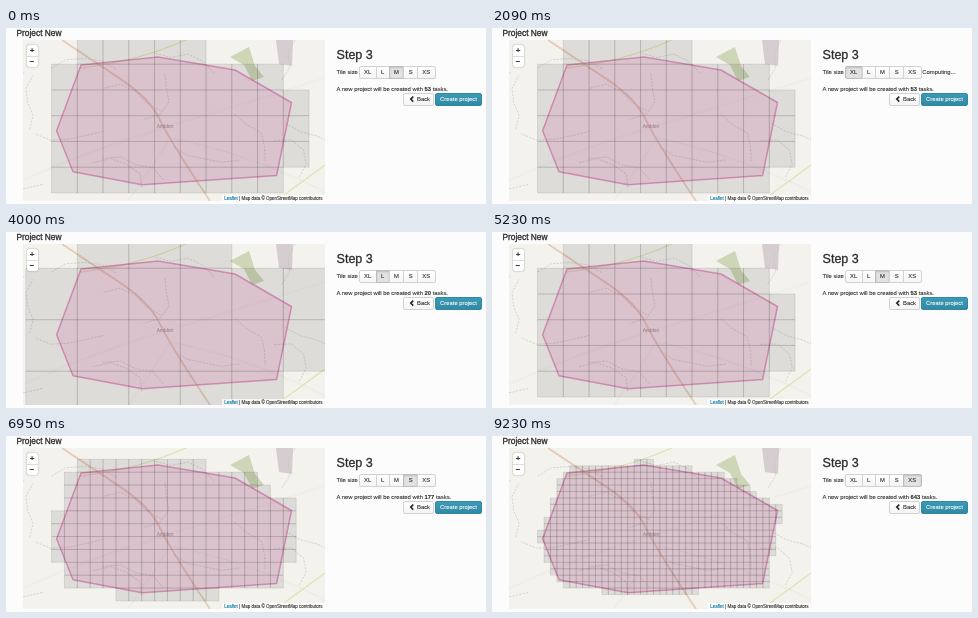
Animation, 480 px wide and 176 px high, one loop 9280 ms. Source, as an HTML page with a canvas:

```html
<!DOCTYPE html>
<html lang="en">
<head>
<meta charset="utf-8">
<title>Project New</title>
<style>
  html, body { margin: 0; width: 100%; height: 100%; overflow: hidden; background: #fdfcfd; }
  #stage { position: relative; width: 480px; height: 176px; overflow: hidden;
    font: 5.87px/8px "Liberation Sans", Arial, sans-serif; color: #2c2c2c; -webkit-text-stroke: .1px; }
  #stage > * { position: absolute; white-space: pre; }
  canvas { left: 0; top: 0; width: 480px; height: 176px; }
  #stage .head { -webkit-text-stroke: .3px; }
  .btn { box-sizing: border-box; height: 13px; line-height: 11px; text-align: center;
    border: 1px solid #d2d2d2; background: linear-gradient(#fff, #f5f5f5); }
  #sizes { left: 352.6px; top: 38px; display: flex; }
  #sizes .btn { padding: 0 4.4px; margin-right: -1px; }
  #sizes .btn:first-child { border-radius: 2px 0 0 2px; }
  #sizes .btn:last-child { border-radius: 0 2px 2px 0; }
  .btn.hover { background: #e6e6e6; }
  .btn.on { background: #e2e2e2; border-color: #bdbdbd; box-shadow: inset 0 1px 2px rgba(0,0,0,.16); }
  #back { left: 397px; top: 65px; width: 31px; border-radius: 2px; text-align: left; padding-left: 13px; }
  #create { left: 429px; top: 65px; width: 47px; border-radius: 2px; color: #fff;
    background: linear-gradient(#3c9ab4, #318aa5); border-color: #3089a4; }
  #credit { right: 161.5px; top: 166.5px; height: 6.5px; padding: 0 2px; font-size: 4.5px; line-height: 7px;
    background: rgba(255,255,255,.72); }
  #credit span { color: #0078a8; }
  #zoom { left: 20.5px; top: 16.5px; width: 11px; height: 22px; border-radius: 2px; background: #fff;
    box-shadow: 0 0 1.5px rgba(0,0,0,.5); font-weight: bold; font-size: 8px; line-height: 11px; text-align: center; }
  #zoom div + div { border-top: 1px solid #ddd; line-height: 10px; }
</style>
</head>
<body>
<div id="stage">
  <canvas id="map"></canvas>
  <div class="head" style="left:10.4px;top:-.4px;font-size:8.4px;line-height:10px">Project New</div>
  <div id="zoom"><div>+</div><div>−</div></div>
  <div id="credit"><span>Leaflet</span> | Map data © OpenStreetMap contributors</div>
  <div class="head" style="left:330.6px;top:20px;font-size:12.5px;line-height:14px">Step 3</div>
  <div style="left:330.6px;top:39.6px">Tile size</div>
  <div id="sizes"></div>
  <div id="wait" style="left:430.3px;top:39.6px">Computing...</div>
  <div style="left:330.6px;top:56.5px">A new project will be created with <b id="count">53</b> tasks.</div>
  <div class="btn" id="back">Back</div>
  <svg style="left:403px;top:68px" width="6" height="7"><path d="M4.3 .6L1.7 3.1L4.3 5.6" fill="none" stroke="#222" stroke-width="1.5"/></svg>
  <div class="btn" id="create">Create project</div>
</div>
<script>
const LOOP = 9280, HOVER_LEAD = 350;
const UNIT = 25.75, X0 = 71.3, Y0 = 36.2;
const SIZES = [
  { name: 'XL', tasks: 9, click: 2090, wait: 230 },
  { name: 'L', tasks: 20, click: 3720, wait: 230 },
  { name: 'M', tasks: 53, click: 5000, wait: 230 },
  { name: 'S', tasks: 177, click: 6230, wait: 230 },
  { name: 'XS', tasks: 643, click: 7820, wait: 880 }
];
const AREA = [[75, 37], [152, 29], [229, 42], [285.5, 74.5], [270.6, 147.5], [136, 156.8], [67, 143.8], [50.6, 102.8]];
const $ = id => document.getElementById(id);

const buttons = SIZES.map(s => {
  const b = document.createElement('div');
  b.className = 'btn';
  b.textContent = s.name;
  $('sizes').append(b);
  return b;
});

const cv = $('map'), g = cv.getContext('2d');
const dpr = window.devicePixelRatio || 1;
cv.width = 480 * dpr;
cv.height = 176 * dpr;

function trace(pts, close) {
  g.beginPath();
  pts.forEach(p => g.lineTo(p[0], p[1]));
  if (close) g.closePath();
}
function shape(color, pts) {
  trace(pts, true);
  g.fillStyle = color;
  g.fill();
}
function stroke(color, width, path, dash = []) {
  g.setLineDash(dash);
  g.strokeStyle = color;
  g.lineWidth = width;
  path ? g.stroke(path) : g.stroke();
  g.setLineDash([]);
}
function seeded(seed) {
  return () => (seed = (seed * 16807) % 2147483647) / 2147483647;
}

// Footpaths wander from evenly spread starting points.
function drawPaths() {
  const rnd = seeded(4217);
  for (let i = 0; i < 15; i++) {
    let x = 17 + (i % 5) * 62 + rnd() * 40;
    let y = 20 + Math.floor(i / 5) * 52 + rnd() * 35;
    let dir = rnd() * Math.PI * 2;
    const pts = [[x, y]];
    for (let k = 0; k < 4; k++) {
      x += Math.cos(dir) * 18;
      y += Math.sin(dir) * 14;
      dir += (rnd() - .5) * 1.8;
      pts.push([x, y]);
    }
    trace(pts);
    stroke('#c2beba', .6, null, [2.2, 1.3]);
  }
}

function drawBase() {
  g.fillStyle = '#f4f2ed';
  g.fillRect(17, 12, 302, 161);
  shape('#cdd6b6', [[224, 29], [243, 19], [249, 38], [258, 49], [246, 53], [238, 37]]);
  shape('#d6cdd0', [[270, 12], [287, 12], [286, 38], [273, 36]]);
  for (const d of ['M17 152Q90 120 157 100T319 50', 'M163 110Q240 125 319 164', 'M164 110Q148 137 122 173']) {
    const lane = new Path2D(d);
    stroke('#e2dfda', 1.4, lane);
    stroke('#fcfbf8', .8, lane);
  }
  drawPaths();
  stroke('#dfe3b4', 1.3, new Path2D('M278 167L319 137M74 40Q130 34 180 12'));
  const road = new Path2D('M56 12L116 52Q144 71 154 92T204 173');
  stroke('#dcc3b0', 1.7, road);
  stroke('#ecd3bd', 1, road);
  g.fillStyle = '#928889';
  g.font = '4.8px "Liberation Sans", Arial, sans-serif';
  g.textAlign = 'center';
  g.fillText('Amblon', 159, 100.3);
}

// The area is convex: a cell misses it only if one edge or axis separates them.
function hits(x, y, s) {
  const xs = AREA.map(p => p[0]), ys = AREA.map(p => p[1]);
  if (x > Math.max(...xs) || x + s < Math.min(...xs)) return false;
  if (y > Math.max(...ys) || y + s < Math.min(...ys)) return false;
  return AREA.every(([ax, ay], i) => {
    const [bx, by] = AREA[(i + 1) % AREA.length];
    return [[x, y], [x + s, y], [x, y + s], [x + s, y + s]]
      .some(([px, py]) => (bx - ax) * (py - ay) - (by - ay) * (px - ax) > 0);
  });
}

function drawGrid(s) {
  const lead = Math.ceil(UNIT / s) * s;
  g.fillStyle = 'rgba(0,0,0,.09)';
  g.strokeStyle = 'rgba(40,40,40,.19)';
  g.lineWidth = .6;
  for (let y = Y0 - lead; y < 173; y += s)
    for (let x = X0 - lead; x < 319; x += s)
      if (hits(x, y, s)) {
        g.fillRect(x, y, s, s);
        g.strokeRect(x, y, s, s);
      }
}

function drawMap(cell) {
  g.setTransform(dpr, 0, 0, dpr, 0, 0);
  g.clearRect(0, 0, 480, 176);
  g.save();
  g.beginPath();
  g.rect(17, 12, 302, 161);
  g.clip();
  drawBase();
  shape('rgba(216,84,164,.18)', AREA);
  g.lineJoin = 'round';
  stroke('rgba(212,90,160,.55)', 1.5);
  drawGrid(cell);
  g.restore();
}

function stateAt(t) {
  const st = { on: 2, shown: 2, hover: -1 };
  SIZES.forEach(({ click, wait }, i) => {
    if (t >= click - HOVER_LEAD) st.hover = i;
    if (t >= click) st.on = i;
    if (t >= click + wait) st.shown = i;
  });
  return st;
}

let lastShown = -1;
function render(t) {
  const { on, shown, hover } = stateAt(t);
  buttons.forEach((b, i) => {
    b.classList.toggle('on', i === on);
    b.classList.toggle('hover', i === hover);
  });
  $('wait').style.visibility = on !== shown ? 'visible' : 'hidden';
  if (shown === lastShown) return;
  lastShown = shown;
  $('count').textContent = SIZES[shown].tasks;
  drawMap(UNIT * 4 / 2 ** shown);
}

const start = performance.now();
function tick() {
  render((performance.now() - start) % LOOP);
  requestAnimationFrame(tick);
}
tick();
</script>
</body>
</html>
```
